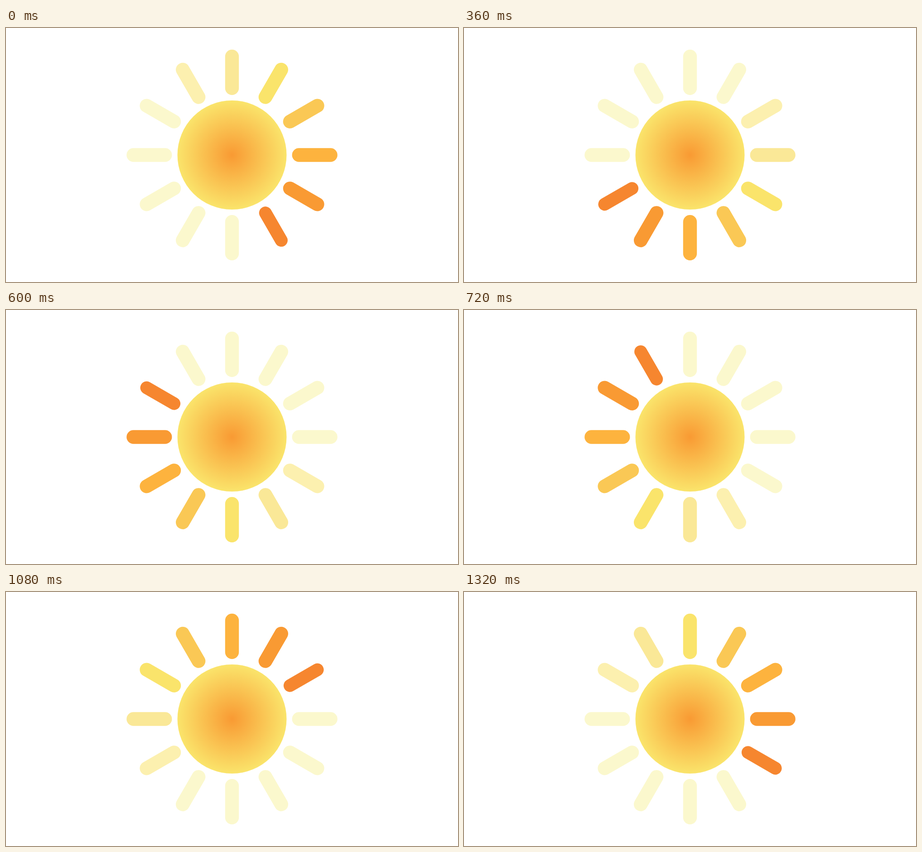
Animation of 998x561 px, one loop 1440 ms. Source, as an HTML page with a canvas:

```html
<!DOCTYPE html>
<html lang="en">
<head>
<meta charset="utf-8">
<title>Sun</title>
<style>
  html, body { margin: 0; width: 100%; height: 100%; overflow: hidden; background: #fff; }
  canvas { display: block; }
</style>
</head>
<body>
<canvas id="stage" width="998" height="561"></canvas>
<script>
const ctx = document.getElementById('stage').getContext('2d');
const W = 998, H = 561, CX = 499, CY = 280.5;
const RAYS = 12, STEP = 120, FIRST = 2;
const DISC = 120.5, INNER = 147.8, OUTER = 217.6;

// Colours from the leading ray backwards; the remaining rays stay pale.
const TRAIL = ['#f6862f', '#f99a33', '#fdb33e', '#fac855', '#fae46b', '#fae897', '#fcf0af'];
const PALE = '#fbf8cd';

const glow = ctx.createRadialGradient(0, 0, 0, 0, 0, DISC);
glow.addColorStop(0, '#f99a33');
glow.addColorStop(1, '#fae46b');

function drawRay(i, lag) {
  const a = i * 2 * Math.PI / RAYS, c = Math.cos(a), s = Math.sin(a);
  ctx.strokeStyle = TRAIL[lag] || PALE;
  ctx.lineWidth = lag === 0 ? 28.2 : 30.4;
  ctx.beginPath();
  ctx.moveTo(c * INNER, s * INNER);
  ctx.lineTo(c * OUTER, s * OUTER);
  ctx.stroke();
}

function draw(time) {
  const head = FIRST + Math.floor(time / STEP) % RAYS;
  ctx.setTransform(1, 0, 0, 1, 0, 0);
  ctx.fillStyle = '#fff';
  ctx.fillRect(0, 0, W, H);
  ctx.translate(CX, CY);
  ctx.lineCap = 'round';
  for (let i = 0; i < RAYS; i++) drawRay(i, (head - i + RAYS) % RAYS);
  ctx.fillStyle = glow;
  ctx.beginPath();
  ctx.arc(0, 0, DISC, 0, 2 * Math.PI);
  ctx.fill();
}

const start = performance.now();
function tick() {
  draw(performance.now() - start);
  requestAnimationFrame(tick);
}
tick();
</script>
</body>
</html>
```
